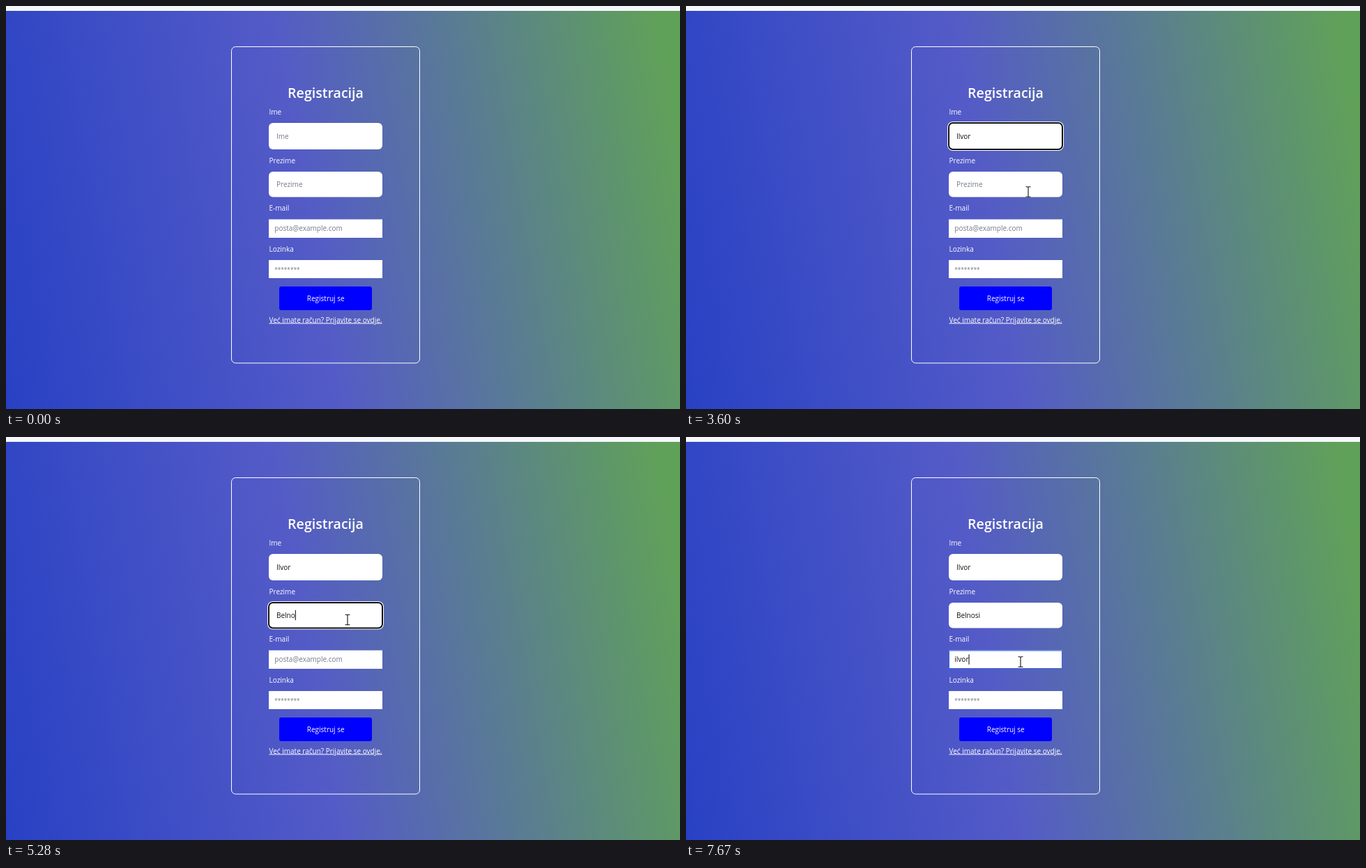
Write an HTML page that moves like this. It is 967x579 px and loops after 8000 ms.

```html
<!DOCTYPE html>
<html lang="bs">
<head>
<meta charset="utf-8">
<title>Registracija</title>
<style>
html, body { margin: 0; width: 100%; height: 100%; overflow: hidden; }
svg { display: block; width: 100vw; height: 100vh; }
text { font: 10px "Open Sans", "Noto Sans", sans-serif; white-space: pre; }
.light { fill: #fff; }
.mid { text-anchor: middle; }
.title { font-size: 19.6px; font-weight: 600; }
.link { text-decoration: underline; }
.popup { filter: drop-shadow(0 1px 1.5px rgba(0, 0, 0, .25)); }
.popup text { font-size: 12.1px; fill: #333; }
</style>
</head>
<body>
<svg id="stage" viewBox="0 0 967 579" preserveAspectRatio="none">
  <defs>
    <linearGradient id="sky" gradientUnits="userSpaceOnUse" x1="-34.3" y1="384.3" x2="1001.3" y2="201.7">
      <stop offset="0" stop-color="#2841c4"/>
      <stop offset=".45" stop-color="#545bc7"/>
      <stop offset=".97" stop-color="#60a159"/>
    </linearGradient>
  </defs>
  <rect width="967" height="579" fill="#f5f7fa"/>
  <rect y="7" width="967" height="572" fill="url(#sky)"/>
  <rect x="323.5" y="58.5" width="270" height="454.5" rx="6" fill="none" stroke="#fff"/>
  <text class="light mid title" x="458.5" y="132">Registracija</text>
  <rect x="392" y="403" width="133" height="34" rx="3" fill="#00f"/>
  <text class="light mid" x="458.7" y="424">Registruj se</text>
  <text class="light mid link" x="458.5" y="454.5">Već imate račun? Prijavite se ovdje.</text>
</svg>
<script>
const LOOP = 8000, BLINK = 520, PITCH = 35.8;
const NS = 'http://www.w3.org/2000/svg';
const stage = document.getElementById('stage');

// keys: the moment each letter of word is typed
const fields = [
  { label: 'Ime', labelY: 156, y: 168, h: 38, round: true, hint: 'Ime', base: 191,
    word: 'Ilvor', focus: 1055, keys: [2040, 2330, 2530, 2590, 2650],
    tip: 208.5, width: 84, list: ['Melnora', 'Tivela', 'Zelmo', 'Orvin', 'Alvena'] },
  { label: 'Prezime', labelY: 225.5, y: 238, h: 36.5, round: true, hint: 'Prezime', base: 259.7,
    word: 'Belnosi', focus: 3810, keys: [4600, 4860, 4930, 5140, 5280, 5380, 5480],
    tip: 277.5, width: 97, list: ['Melnorvic', 'Zavo', 'Torelić', 'Šelo', 'Vurdic'] },
  { label: 'E-mail', labelY: 294, y: 306.5, h: 26.5, hint: 'posta@example.com', base: 323.3,
    word: 'ilvor', focus: 6560, keys: [7230, 7400, 7470, 7570, 7670],
    tip: 334, width: 203, list: ['tilvanaro1@example.com', 'kvelenora3@fax.example', 'alvo1@fax.example',
      'meldavelora85@example.com', 'tiv1@example.com', 'tilvanaro@example.com'] },
  { label: 'Lozinka', labelY: 353, y: 365, h: 26, hint: '********', base: 381.8, size: 8.2,
    word: '', focus: Infinity, keys: [] }
];

// time, x, y of the pointer
const path = [
  [140, 860, 531], [780, 455.5, 188], [1340, 455.5, 188], [1370, 456, 188.5],
  [3120, 456, 188.5], [3600, 491, 267], [3800, 490, 262.5],
  [6160, 490, 262.5], [6440, 480, 321], [6540, 480, 323]
];

function add(parent, tag, attrs, text) {
  const el = document.createElementNS(NS, tag);
  for (const k in attrs) el.setAttribute(k, attrs[k]);
  if (text !== undefined) el.textContent = text;
  parent.appendChild(el);
  return el;
}

function show(el, on) {
  el.setAttribute('visibility', on ? 'visible' : 'hidden');
}

function box(parent, f, grow, fill) {
  return add(parent, 'rect', {
    x: 377 - grow, y: f.y - grow, width: 163 + 2 * grow, height: f.h + 2 * grow,
    rx: f.round ? 6 + grow : 0, fill
  });
}

function buildField(f) {
  const x = f.round ? 388 : 385.3;
  add(stage, 'text', { class: 'light', x: 377.5, y: f.labelY }, f.label);
  box(stage, f, 0, '#fff');
  f.ring = add(stage, 'g', {});
  if (f.round) {
    box(f.ring, f, 2, '#fff');
    box(f.ring, f, 1, '#101010');
    box(f.ring, f, -1, '#fff');
  } else {
    box(f.ring, f, 0, '#3a6ae0');
    box(f.ring, f, -1, '#fff');
  }
  f.text = add(stage, 'text', { x, y: f.base });
  if (f.size) f.text.style.fontSize = f.size + 'px';
  f.caret = add(stage, 'rect', { y: f.base - 11, width: 1, height: 14.5, fill: '#000' });
  f.x = x;
}

function buildPopup(f) {
  if (!f.list) return;
  f.popup = add(stage, 'g', { class: 'popup' });
  add(f.popup, 'path', { d: 'M-9 8.5L0 0L9 8.5Z', fill: '#fff' });
  add(f.popup, 'rect', {
    x: -20, y: 8, width: f.width, height: 44 + PITCH * (f.list.length - 1), rx: 3, fill: '#fff'
  });
  f.list.forEach((name, i) => add(f.popup, 'text', { x: -8.5, y: 35 + PITCH * i }, name));
}

fields.forEach(buildField);
const halo = add(stage, 'circle', { r: 12, fill: '#fff34d', 'fill-opacity': .72 });
fields.forEach(buildPopup);

const beam = add(stage, 'g', { fill: 'none' });
const beamShape = 'M-3.5 -7.2H-1Q0 -7.2 0 -6.2Q0 -7.2 1 -7.2H3.5M0 -6.5V6.5M-3.5 7.2H-1Q0 7.2 0 6.2Q0 7.2 1 7.2H3.5';
add(beam, 'path', { d: beamShape, stroke: '#fff', 'stroke-width': 2.2, 'stroke-opacity': .6 });
add(beam, 'path', { d: beamShape, stroke: '#111', 'stroke-width': 1.1 });
const arrow = add(stage, 'path', {
  d: 'M0 0V15L3.4 11.8L5.7 17L8 16L5.8 11H10.5Z', fill: '#fff', stroke: '#000', 'stroke-width': .9
});

function pointerAt(t) {
  let i = path.length - 1;
  while (i > 0 && path[i][0] > t) i--;
  const a = path[i], b = path[i + 1] || a;
  const p = b === a ? 0 : Math.max(0, (t - a[0]) / (b[0] - a[0]));
  const e = i === 0 ? 1 - (1 - p) ** 2 : p * p * (3 - 2 * p);
  return [a[1] + (b[1] - a[1]) * e, a[2] + (b[2] - a[2]) * e];
}

function drawField(f, t, active) {
  const n = f.keys.filter(k => k <= t).length;
  f.text.textContent = n ? f.word.slice(0, n) : f.hint;
  f.text.setAttribute('fill', n ? '#111' : '#747a88');
  show(f.ring, active);

  const last = n ? f.keys[n - 1] : f.focus;
  show(f.caret, active && Math.floor((t - last) / BLINK) % 2 === 0);
  if (active) f.caret.setAttribute('x', f.x + (n ? f.text.getComputedTextLength() : 0));

  if (!f.popup) return;
  const alpha = Math.min(1, 1 - (t - f.keys[0] - 50) / 160);
  const open = active && t >= f.focus + 70 && alpha > 0;
  show(f.popup, open);
  if (open) {
    f.popup.setAttribute('opacity', alpha);
    f.popup.setAttribute('transform', `translate(458 ${f.tip}) scale(${.95 + .05 * alpha})`);
  }
}

function render(t) {
  const current = fields.filter(f => f.focus <= t).pop();
  fields.forEach(f => drawField(f, t, f === current));

  const [x, y] = pointerAt(t);
  const inside = x > 377 && x < 540 && fields.some(f => y > f.y && y < f.y + f.h);
  const at = `translate(${x} ${y})`;
  beam.setAttribute('transform', at);
  arrow.setAttribute('transform', at);
  show(beam, t >= 140 && inside);
  show(arrow, t >= 140 && !inside);

  show(halo, current && t < current.focus + (current === fields[0] ? 70 : 120));
  halo.setAttribute('cx', x - 2);
  halo.setAttribute('cy', y - .7);
}

function tick() {
  render(performance.now() % LOOP);
  requestAnimationFrame(tick);
}
tick();
</script>
</body>
</html>
```
